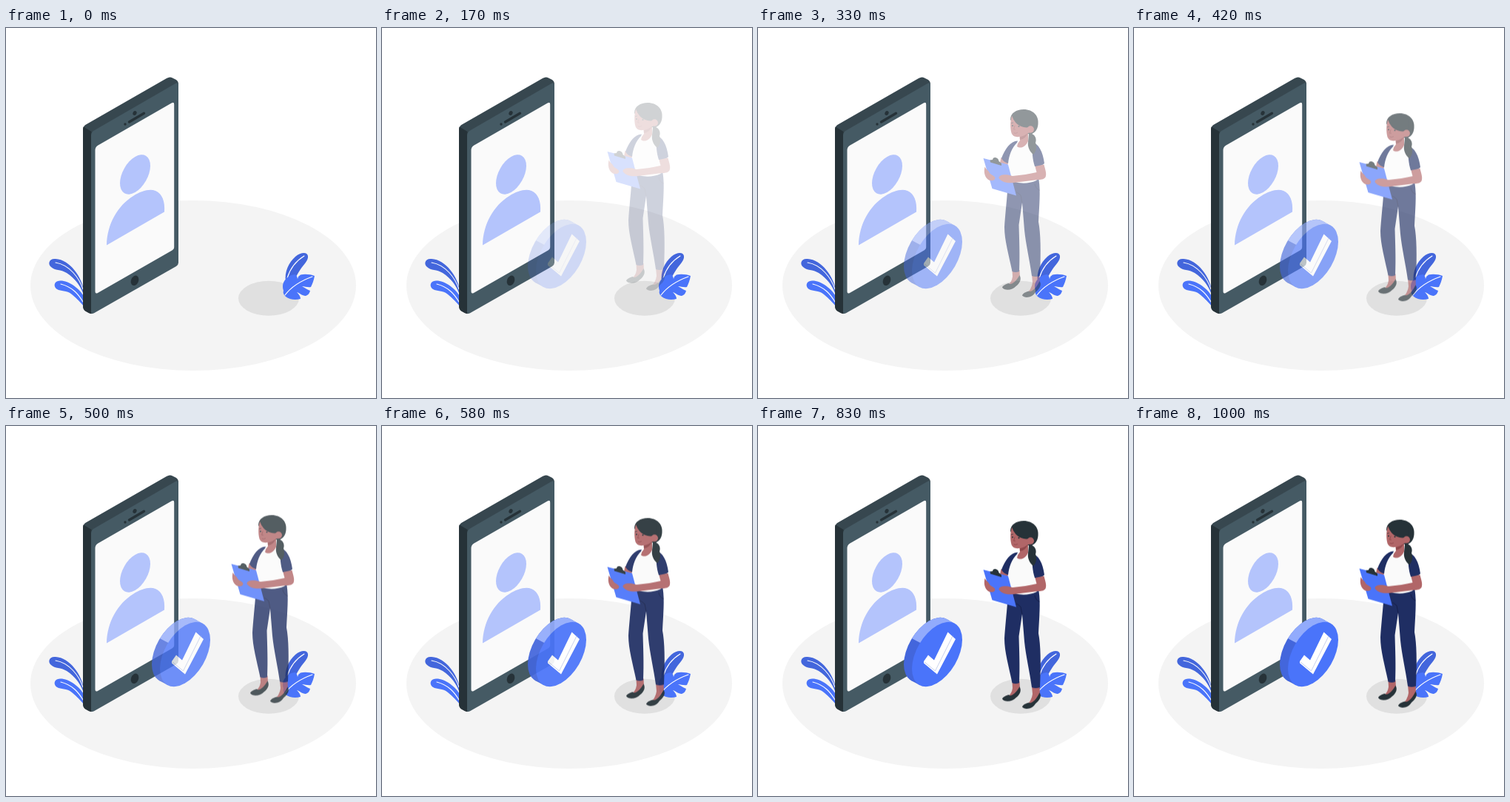
Recreate the animation shown at these times as an HTML page. Size 500x500 px, loop 1.04 s.

```html
<!DOCTYPE html>
<html lang="en">
<head>
<meta charset="utf-8">
<title>Verified profile</title>
<style>
  html, body { margin: 0; width: 100%; height: 100%; overflow: hidden; background: #fff; }
  svg { display: block; width: 100%; height: 100%; }
  .blue { fill: #4a74fa; }
  .deep { fill: #4366dc; }
  .navy { fill: #1f2e63; }
  .ink { fill: #263238; }
  .skin { fill: #b16668; }
  .pale { fill: #b4c4fc; }
  .line { fill: none; stroke-linecap: round; stroke-linejoin: round; }
  .vein { stroke: #fff; stroke-width: 1.1; }
  #badge, #woman { opacity: 0; }
</style>
</head>
<body>
<svg viewBox="0 0 500 500">
  <defs>
    <g id="rim">
      <ellipse rx="34" ry="39" transform="matrix(1 -.577 0 1 231 302.5)"/>
      <path d="M254.8 261L265.8 267L218.2 350L207.2 344Z"/>
    </g>
    <clipPath id="upper"><path d="M197 281.3L222 294.5H280V250H197Z"/></clipPath>
  </defs>

  <ellipse cx="253" cy="348" rx="220" ry="115" fill="#f4f4f4"/>
  <ellipse cx="355" cy="365.3" rx="41" ry="23.5" fill="#e0e0e0"/>

  <g id="left-leaves">
    <path class="deep" d="M106 358C103 336 86 313 67 312C58 311 56 319 61 323C66 328 74 326 82 331C94 339 100 348 104 358Z"/>
    <path class="blue" d="M106 377V364C100 352 84 341 73 341.5C64 342 64 350 69 353C74 356 82 354 89 360C96 366 101 371 106 377Z"/>
    <path class="line vein" d="M67 317C86 320 99 338 104 353M74 346C90 350 98 360 104 370"/>
  </g>

  <g id="right-leaves">
    <path class="deep" d="M378 342C376 330 382 317 391 309C398 303 407 302 408 308C409 314 402 320 398 326C394 332 391 338 386 345Z"/>
    <path class="line vein" d="M380 338C384 325 393 314 403 308"/>
    <path class="blue" d="M375 355C372 346 376 340 382 336C385 334 388 333 391 333Q394 336 394 339Q395 335 398 333.5C404 332 412 333 417 335C416 341 414 346 412 350C408 351 404 349 400 349C404 351 408 354 411 355C410 359 408 361 405 362C400 362 397 358 393 357C396 360 398 363 398 366C391 368 383 367 378 363C375 360 374 358 375 355Z"/>
    <path class="line vein" d="M377 361C386 349 400 341 414 336"/>
  </g>

  <g id="phone">
    <path fill="#37474f" d="M104 137Q104 133 108 130.5L217 68Q222 65 226 68L230 70Q233 72 233 76V317L116 386Q104 382 104 376Z"/>
    <path class="ink" d="M104.6 133.5L115.5 140V386.3Q113 386 111 384.8L107 382.5Q104 380 104 376V137Z"/>
    <path fill="#455a64" d="M115 145Q115 141 119 138.5L229 75Q233 73 233 76V317Q233 320 230 322L119 385.3Q115 387.3 115 384Z"/>
    <path fill="#fafafa" d="M120.5 165Q120.5 161 124 158.7L224 101.2Q227.2 99.5 227.2 103V296Q227.2 299 224 300.7L124 358Q120.5 359.7 120.5 356Z"/>
    <ellipse class="ink" rx="2.5" ry="3.1" transform="translate(174 115) rotate(25)"/>
    <circle class="ink" cx="161" cy="130" r="1.7"/>
    <path class="line" stroke="#263238" stroke-width="3.4" d="M166.5 127L186.5 115.3"/>
    <ellipse class="ink" rx="5" ry="7" transform="translate(174 341.3) rotate(22)"/>
    <ellipse class="pale" rx="20.5" ry="24" transform="matrix(1 -.577 0 1 174.5 198)"/>
    <path class="pale" d="M136 293.5C136.500 265 151 240 172 227C183 220 194 217 202 220C211 224 215 234 214 248.500Z"/>
  </g>

  <g id="badge">
    <use href="#rim" class="deep"/>
    <use href="#rim" fill="#92abfc" clip-path="url(#upper)"/>
    <ellipse class="blue" rx="34" ry="39" transform="matrix(1 -.577 0 1 242 308.5)"/>
    <path fill="#fff" d="M224 318L230 309.500L238 316.500L256.500 278.500L267 288L242 335.500L224 320.500Z"/>
    <path class="line" stroke="#b9c4e6" stroke-width=".8" d="M263 284L239.500 331L225 319"/>
  </g>

  <g id="woman">
    <g id="legs">
      <path class="skin" d="M343.500 344H353.500L354 354L345 364L336 366Q343 361 344 353ZM370 350H380.500L381 362L371 374L362 377Q370 370 371 361Z"/>
      <path class="ink" d="M353.500 351C356.500 356 354 362 348.500 366C344 371.500 333 372.500 330 367.500C331 364.500 336 362.800 339 362C341 365 348 361 353.500 351ZM380.500 359C384 364 380.500 369.500 375 374C371 381 361 383 357 378.500C358 375 363 373.500 366 372.500C369 375 376 369 380.500 359Z"/>
      <path class="navy" d="M341 224L379.500 222C382 238 380 258 379 279C382 294 382.500 318 381 352Q375 354 370 352C367 330 362 310 360 290L357 253L352.500 283C353 304 354 322 353 346Q348 348 343.500 346C339 324 333 304 333 286C334 270 336 252 337 238Z"/>
      <path class="line" stroke="#16204a" stroke-width="1" d="M357 253L355 243L350 239M374 228Q375 234 380 236"/>
    </g>
    <g id="torso">
      <path class="skin" d="M328.500 192L338 199L336 207L326 204Z"/>
      <path fill="#fafafa" d="M350 170C342 177 338 188 338 200L344 224Q360 230 376.500 223L376 204L373 173L365 169Z"/>
      <path class="navy" d="M351 169.500C341 170 334 180 329 193C331 197 335 199 338 200C339 189 343 179 350 172ZM371 172C379 173 385 184 387 200C383 203.500 378 204.500 374 204C371 195 370 184 371 172Z"/>
      <path class="skin" d="M353 160L365 156V170C362 177 355 181 350 177Q351 172 354 169Z"/>
      <path fill="#8f484b" d="M354 164Q361 163 365 158Q362 167 354 168Z"/>
    </g>
    <g id="head">
      <path class="ink" d="M341 141C341 132 349 127 359 127C372 127 380 136 378.500 147C378 155 373 160 367 161L350 152Z"/>
      <path class="skin" d="M343 136C341 142 340.500 151 342.500 159C345 165.500 353 165 358 162L368 158V144L350 136Z"/>
      <path class="ink" d="M343 135C345 142 350 149 359 151C364 152 368 151 370 148L372 135L357 128Z"/>
      <circle class="skin" cx="368.300" cy="154" r="4.700"/>
      <path class="ink" d="M366 160C373 158 377.500 166 375 172C377.500 178 375.500 185 372 188C367 184 364 177 365 171Z"/>
      <circle class="ink" cx="344" cy="149" r="1"/>
      <circle class="ink" cx="352.500" cy="150" r="1.100"/>
      <path class="line" stroke="#263238" stroke-width=".7" d="M342.500 145.500L344.500 145M351 146L355 147.500"/>
      <path class="line" stroke="#8f484b" stroke-width=".9" d="M347 149L345.500 154H347.500M346 159Q348.500 160 350.500 158.500"/>
    </g>
    <g id="clipboard">
      <path class="blue" d="M304.500 193L338 201.500L349 243.500L316.500 234Z"/>
      <path class="ink" d="M313.500 195.500L317 195Q317.500 191.500 321 192Q325 193 325.500 197L329 200V203L314 198.500Z"/>
    </g>
    <g id="arms">
      <path class="skin" d="M306.500 204.500C305 211 306 217 310 221C313 224 320 224.500 320.500 219.500C319 215.500 314 216 312.500 212C311 209 308 208 306.500 204.500Z"/>
      <path class="skin" d="M374.500 204L386.500 201.500C388 208 390.500 214 388.500 218.500C386 222 382 222 378 222L346 226C338 227 330 226 325.500 220C325 215.500 332 214.500 338 215.500L344 217C356 216 367 214 376.500 212Z"/>
    </g>
  </g>
</svg>
<script>
  const LOOP = 1040, FPS = 24, LAST = 24;

  // [step, vertical offset]
  const drop = [[0, -29.5], [2, -28.4], [4, -26], [6, -22], [8, -17], [10, -11.7], [12, -6.6],
                [14, -2.6], [16, 0], [18, 1], [20, 1.2], [22, .7], [24, -.4]];

  const stepTime = n => Math.round(n * 100 / FPS) * 10;
  const fade = n => Math.min(1, Math.max(0, (n - 1) / 14));

  function offsetAt(n) {
    const i = Math.max(1, drop.findIndex(p => p[0] >= n));
    const [a, ya] = drop[i - 1], [b, yb] = drop[i];
    return ya + (yb - ya) * (n - a) / (b - a);
  }

  function play(id, pose) {
    const frames = Array.from({ length: LAST + 1 }, (_, n) =>
      ({ offset: stepTime(n) / LOOP, easing: 'step-end', ...pose(n) }));
    frames.push({ offset: 1, ...pose(LAST) });
    document.getElementById(id)
      .animate(frames, { duration: LOOP, iterations: Infinity });
  }

  play('badge', n => ({ opacity: fade(n) }));
  play('woman', n => ({ opacity: fade(n), transform: `translateY(${offsetAt(n)}px)` }));
</script>
</body>
</html>
```
